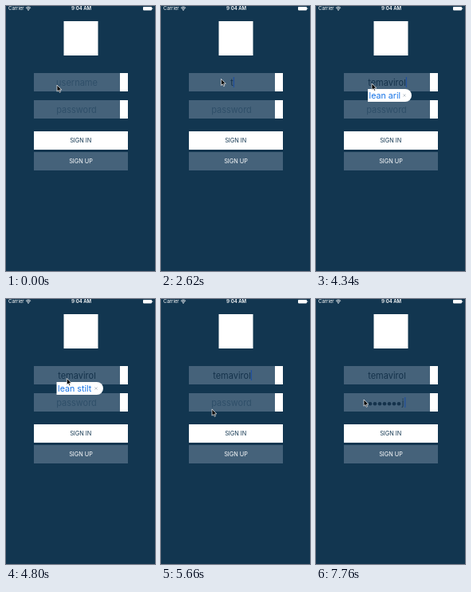
Animation, 187 px wide and 332 px high, one loop 8000 ms. Source, as an HTML page:

```html
<!DOCTYPE html>
<html lang="en">
<head>
<meta charset="utf-8">
<title>Sign in</title>
<style>
  html, body { margin: 0; width: 100%; height: 100%; overflow: hidden; background: #123650; }
  svg { display: block; width: 100%; height: 100%; }
  text { font-family: Inter, Roboto, "Liberation Sans", sans-serif; }
  .field { font-size: 11px; text-anchor: middle; fill: #14324b; }
  .hint { fill: #2f4f69; }
  .button { font-size: 7.3px; text-anchor: middle; }
  .status { font-size: 6px; fill: #fff; }
</style>
</head>
<body>
<svg viewBox="0 0 187 332">
  <rect width="187" height="332" fill="#123650"/>

  <text class="status" x="3" y="5.3">Carrier</text>
  <g fill="none" stroke="#fff" stroke-width=".9">
    <path d="M24.9 2.4Q28 -.3 31.1 2.4M26.1 3.7Q28 2.1 29.9 3.7"/>
    <circle cx="28" cy="5" r=".4"/>
  </g>
  <text class="status" x="94.5" y="5.3" text-anchor="middle" font-weight="600">9:04 AM</text>
  <rect x="172" y="1" width="11" height="4.4" rx=".8" fill="#fff"/>
  <rect x="183.4" y="2.3" width=".8" height="1.8" fill="#fff"/>

  <rect x="72.5" y="19" width="43" height="43" fill="#fff"/>

  <g fill="#45627a">
    <rect x="35" y="84" width="108" height="23"/>
    <rect x="35" y="118" width="108" height="23"/>
    <rect x="35" y="183" width="118" height="23"/>
  </g>
  <g fill="#fff">
    <rect x="143" y="84" width="10" height="23"/>
    <rect x="143" y="118" width="10" height="23"/>
    <rect x="35" y="157" width="118" height="23"/>
  </g>
  <text class="button" x="93.7" y="171.2" fill="#123650">SIGN IN</text>
  <text class="button" x="94" y="197.2" fill="#fff">SIGN UP</text>

  <text id="user" class="field" x="89" y="100"></text>
  <text id="pass" class="field" x="88.5" y="134"></text>
  <g id="dots" fill="#14324b"></g>
  <rect id="caret" width="1.2" height="13" fill="#1f4f9e"/>

  <g id="bubble">
    <path id="shell"/>
    <text id="guess" y="115.8" font-size="10.7" fill="#1673e6"></text>
    <path id="cross" d="M-1.6 -1.6L1.6 1.6M1.6 -1.6L-1.6 1.6" stroke="#a9b3bd" stroke-width=".7"/>
  </g>

  <path id="cursor" d="M0 0V8.2L1.9 6.5L3.2 9.3L4.5 8.7L3.3 6H5.8Z"
        fill="#000" stroke="#fff" stroke-width=".7" stroke-linejoin="round"/>
</svg>
<script>
const LOOP = 8000;
const NAME = "temavirol";
const NAME_KEYS = [2560, 2840, 3040, 3240, 3440, 3900, 4020, 4160, 4280];
const PASS_KEYS = [7080, 7400, 7450, 7500, 7550, 7600, 7620, 7760];
const DOT_STEP = 6;

// time, x, y of the pointer tip
const PATH = [
  [0, 64, 99], [1660, 64, 99], [1840, 70, 96.5],
  [2360, 70, 96.5], [2430, 46, 81], [2500, 68, 62], [2570, 90, 76], [2640, 70, 97],
  [4720, 70, 97], [5260, 112, 113], [5400, 112, 113],
  [5540, 86, 147], [5660, 64, 138], [5920, 60, 126], [LOOP, 60, 126]
];

// start, text, left edge, right edge
const GUESSES = [
  [3500, "leans", 71.5, 114],
  [3980, "leans", 71.5, 114],
  [4300, "lean aril", 65, 120],
  [4460, "lean stilt", 63.5, 122]
];

const $ = id => document.getElementById(id);
const [user, pass, dots, caret, bubble, shell, guess, cross, cursor] =
  ["user", "pass", "dots", "caret", "bubble", "shell", "guess", "cross", "cursor"].map($);
const show = (el, on) => el.setAttribute("visibility", on ? "visible" : "hidden");
const between = (t, a, b) => t >= a && t < b;
const typed = (keys, t) => keys.filter(k => k <= t).length;

for (let i = 0; i < PASS_KEYS.length; i++) {
  const dot = document.createElementNS("http://www.w3.org/2000/svg", "circle");
  dot.setAttribute("cy", 131.3);
  dot.setAttribute("r", 2.3);
  dots.append(dot);
}

function setText(el, text, hint) {
  if (el.textContent !== text) el.textContent = text;
  el.classList.toggle("hint", hint);
}

function drawName(t) {
  const count = typed(NAME_KEYS, t);
  setText(user, count ? NAME.slice(0, count) : "username", !count);
  return count ? 89 + user.getComputedTextLength() / 2 : 62.4;
}

// Earlier characters are masked, the newest one stays readable.
function drawPassword(t) {
  const count = typed(PASS_KEYS, t);
  const left = 88.5 - ((count - 1) * DOT_STEP + 3) / 2;
  const lastX = left + (count - 1) * DOT_STEP + 1;
  setText(pass, count ? "j" : "password", !count);
  pass.setAttribute("x", count ? lastX : 88.5);
  [...dots.children].forEach((dot, i) => {
    dot.setAttribute("cx", left + (i + .5) * DOT_STEP - 1);
    show(dot, i < count - 1);
  });
  return count ? lastX + 2.2 : 62.4;
}

function drawCaret(t, nameEnd, passEnd) {
  const inPass = t >= 6140;
  caret.setAttribute("x", inPass ? passEnd : nameEnd);
  caret.setAttribute("y", inPass ? 123 : 89);
  const off = t < 440 || between(t, 1080, 1660) || between(t, 4700, 5520) || between(t, 6900, 7080);
  show(caret, !off);
}

function drawBubble(t) {
  const on = between(t, GUESSES[0][0], 5480);
  show(bubble, on);
  if (!on) return;
  const [, text, left, right] = GUESSES.filter(g => g[0] <= t).pop();
  setText(guess, text, false);
  guess.setAttribute("x", left + 1.6);
  shell.setAttribute("d", `M${left} 104H${right - 8}a8 8 0 0 1 0 16H${left}Z`);
  shell.setAttribute("fill", t >= 5240 ? "#c9d1d8" : "#fff");
  cross.setAttribute("transform", `translate(${right - 9} 112)`);
  bubble.setAttribute("opacity", Math.min(1, (t - GUESSES[0][0]) / 100));
}

function drawCursor(t) {
  const i = PATH.findIndex(p => p[0] > t);
  const [t0, x0, y0] = PATH[i - 1], [t1, x1, y1] = PATH[i];
  const k = (t - t0) / (t1 - t0);
  cursor.setAttribute("transform", `translate(${x0 + (x1 - x0) * k} ${y0 + (y1 - y0) * k})`);
}

function draw(now) {
  const t = now % LOOP;
  drawCaret(t, drawName(t), drawPassword(t));
  drawBubble(t);
  drawCursor(t);
}

const start = performance.now();
function tick() {
  draw(performance.now() - start);
  requestAnimationFrame(tick);
}
tick();
</script>
</body>
</html>
```
